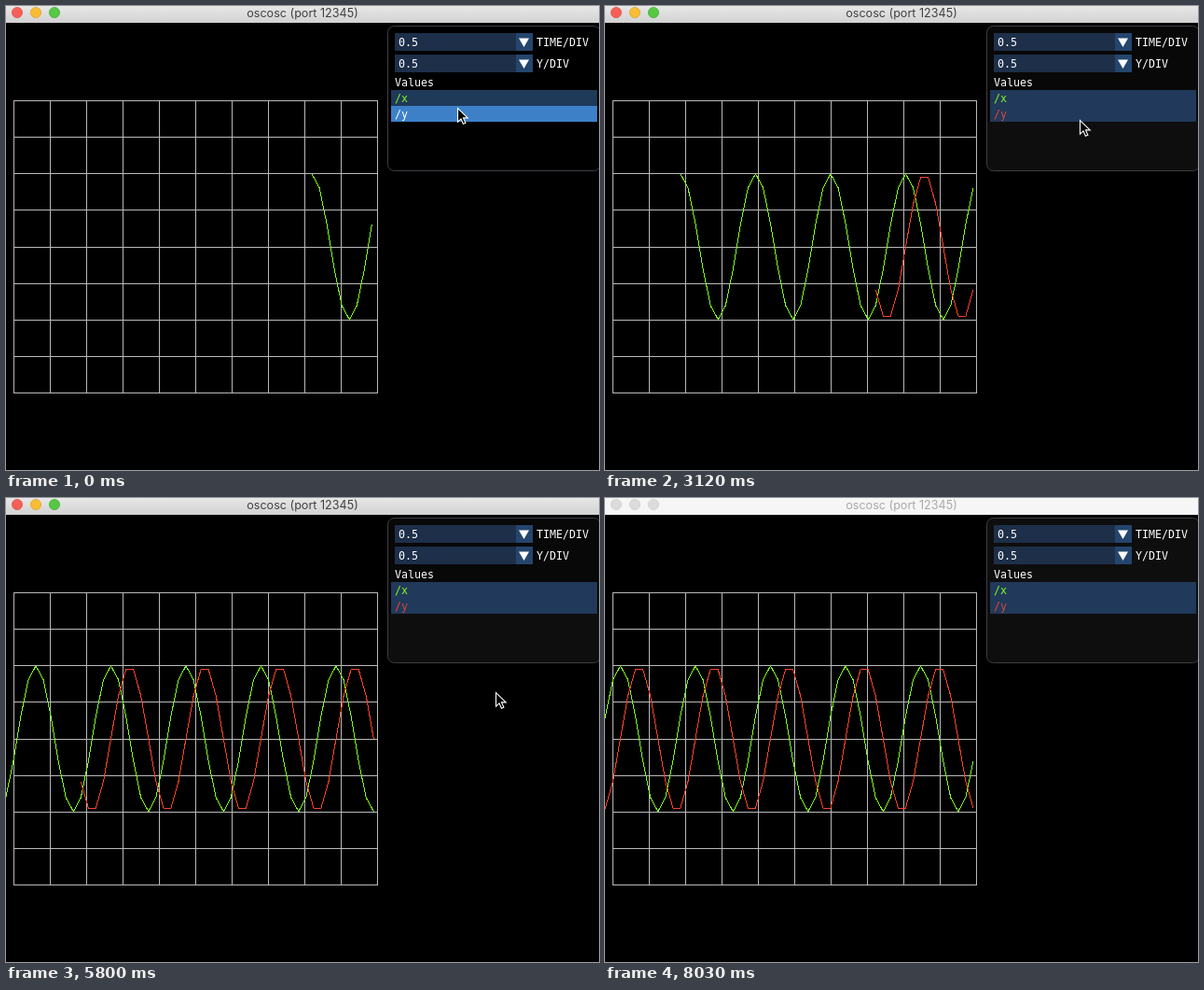
These frames come from a looping animation (636x497 px, 8130 ms). An HTML page:

```html
<!DOCTYPE html>
<html lang="en">
<head>
<meta charset="utf-8">
<title>oscosc</title>
<style>
  html, body { margin: 0; width: 100%; height: 100%; overflow: hidden; background: #000; }
  svg { display: block; }
  text { white-space: pre; }
  .mono { font: 11.63px "DejaVu Sans Mono", monospace; fill: #fff; }
  .title { font: 12.6px Inter, "Liberation Sans", sans-serif; fill: #404040; text-anchor: middle; }
  .crisp { shape-rendering: crispEdges; fill: none; stroke-width: 1; }
  .idle .title { fill: #a9a9a9; }
  .idle #bar { fill: #f6f6f6; }
  .idle #lights circle { fill: #dcdcdc; stroke: #cbcbcb; }
</style>
</head>
<body>
<svg id="stage" width="636" height="497" viewBox="0 0 636 497">
  <defs>
    <linearGradient id="chrome" x1="0" y1="0" x2="0" y2="1">
      <stop offset="0" stop-color="#e7e7e7"/>
      <stop offset="1" stop-color="#d2d2d2"/>
    </linearGradient>
  </defs>
  <rect width="636" height="497" fill="#000"/>

  <rect id="bar" width="636" height="18" fill="url(#chrome)"/>
  <g id="lights">
    <circle cx="12" cy="7" r="5.6" fill="#f55f57" stroke="#df4a43" stroke-width=".7"/>
    <circle cx="32" cy="7" r="5.6" fill="#f8bd34" stroke="#dda02c" stroke-width=".7"/>
    <circle cx="52" cy="7" r="5.6" fill="#57c843" stroke="#3caa30" stroke-width=".7"/>
  </g>
  <text class="title" x="318" y="12">oscosc (port 12345)</text>

  <path id="grid" class="crisp" stroke="#b9b9b9"/>
  <polyline id="green" class="crisp" stroke="#80fa22"/>
  <polyline id="red" class="crisp" stroke="#fa4426"/>

  <rect id="panel" x="409.5" y="21.5" width="228" height="155" rx="7" fill="#000"/>
  <path id="lower" d="M410 124H636V176H417Q410 176 410 169Z" fill="#0e0e0e"/>
  <rect x="409.5" y="21.5" width="228" height="155" rx="7" fill="none" stroke="#3e3e47"/>
  <g id="combos"></g>
  <text class="mono" x="417" y="86">Values</text>
  <rect id="rowX" x="413" y="90" width="221" height="17"/>
  <rect id="rowY" x="413" y="107" width="221" height="17"/>
  <text class="mono" x="417" y="103" style="fill:#80fa22">/x</text>
  <text class="mono" x="417" y="120"><tspan id="slash">/</tspan><tspan id="letter">y</tspan></text>

  <path id="cursor" d="M.5 .5V15.2L4 11.9L6.4 17.3L8.9 16.2L6.5 10.9H11.2Z"
        fill="#000" stroke="#fff" stroke-width="1.1"/>
</svg>
<script>
const $ = id => document.getElementById(id);

// Steps last 150 ms, a few 140, the final one 100.
const STEPS = 55, SHORT = [0, 9, 18, 33, 37, 42, 47];
const ends = [];
for (let k = 0, t = 0; k < STEPS; k++) {
  t += k === STEPS - 1 ? 100 : SHORT.includes(k) ? 140 : 150;
  ends.push(t);
}
const LOOP = ends[STEPS - 1];

// [step, x of the first sample]
const SCROLL = [[0, 328], [12, 186], [21, 81], [33, -60], [39, -129], [47, -224.2], [54, -305.5]];
// [step, x, y] of the pointer tip
const POINTER = [
  [0, 484, 109], [16, 484, 109], [18, 497, 126], [19, 504, 132], [21, 509, 122],
  [23, 511, 101], [25, 512, 105], [27, 514, 138], [38, 514, 138],
  [39, 525, 208], [40, 543, 300], [41, 567, 395], [42, 594, 482], [43, 600, 560], [54, 600, 560]
];
const GAP = 8.05, MID = 257.8, AMP = 78, EDGE = 398.5;
const RED_FROM = 26, PICK = 12, LEAVE = 18, BLUR = 53;
const ROW = "#1f3958", HOVER = "#3d80c8";

function at(table, k) {
  let i = 1;
  while (i < table.length - 1 && table[i][0] < k) i++;
  const a = table[i - 1], b = table[i], p = (k - a[0]) / (b[0] - a[0]);
  return a.slice(1).map((v, j) => v + (b[j + 1] - v) * p);
}

function wave(x0, from, fn) {
  const pts = [];
  for (let n = from; x0 + n * GAP <= EDGE; n++) {
    const x = x0 + n * GAP;
    if (x > -20) pts.push(x.toFixed(1) + "," + (MID - AMP * fn(n * Math.PI / 5)).toFixed(1));
  }
  return pts.join(" ");
}

function buildStatic() {
  let d = "";
  for (let i = 0; i <= 10; i++) d += `M${8.5 + i * 39} 101V415`;
  for (let i = 0; i <= 8; i++) d += `M8 ${Math.round(101 + i * 39.15) + 0.5}H399`;
  $("grid").setAttribute("d", d);
  $("combos").innerHTML = [["TIME/DIV", 0], ["Y/DIV", 23]].map(([label, y]) =>
    `<g transform="translate(0 ${y})">
      <rect x="417" y="29" width="130" height="19" fill="#1d2f49"/>
      <rect x="547" y="29" width="18" height="19" fill="#24456d"/>
      <path d="M550 34.5H561L555.5 44Z" fill="#fff"/>
      <text class="mono" x="421" y="43">0.5</text>
      <text class="mono" x="569" y="43">${label}</text>
    </g>`).join("");
}

function draw(k) {
  const [x0] = at(SCROLL, k), [cx, cy] = at(POINTER, k);
  const picked = k >= PICK, left = k >= LEAVE, idle = k >= BLUR;
  $("green").setAttribute("points", wave(x0, 0, Math.cos));
  $("red").setAttribute("points", wave(x0, RED_FROM, Math.sin));
  $("cursor").setAttribute("transform", `translate(${cx} ${cy})`);

  const base = left ? "#21395a" : ROW;
  const overX = left && cy >= 90 && cy < 107;
  $("rowX").setAttribute("fill", overX ? HOVER : base);
  $("rowY").setAttribute("fill", left ? base : HOVER);
  $("slash").style.fill = picked ? "#f8402a" : "#fff";
  $("letter").style.fill = !picked ? "#fff" : left ? "#cf4a3e" : "#7a6f9c";

  $("lower").style.display = picked ? "" : "none";
  $("panel").setAttribute("fill", idle ? "#0e0e0e" : picked ? "#080808" : "#000");
  $("stage").classList.toggle("idle", idle);
}

buildStatic();
const start = performance.now();
let shown = -1;
function tick() {
  const t = (performance.now() - start) % LOOP;
  const k = ends.findIndex(end => t < end);
  if (k !== shown) draw(shown = k);
  requestAnimationFrame(tick);
}
tick();
</script>
</body>
</html>
```
